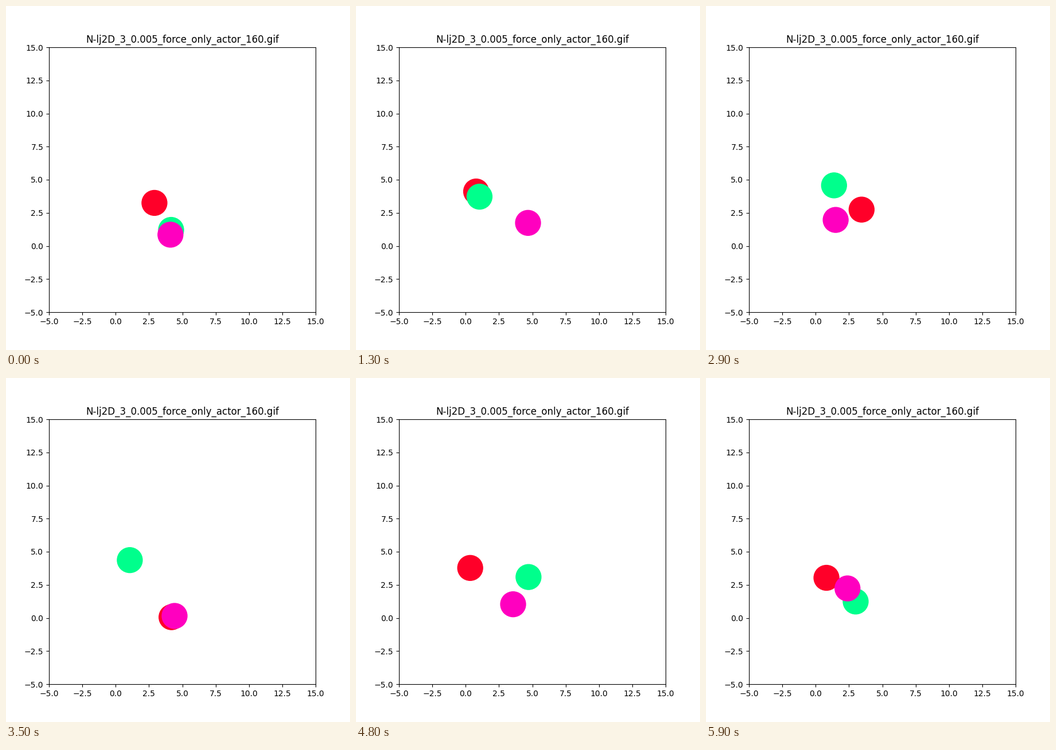
A matplotlib script for the animation above (6 s loop, 600 by 600 pixels).

```python
import matplotlib.pyplot as plt
import numpy as np
from matplotlib.animation import FuncAnimation

FRAMES = 60
INTERVAL = 100
CELL = 5.0   # side of the periodic box
DECAY = 50   # frames over which the initial kick fades

# One (x, y) row per particle; speeds are per frame.
START = np.array([(2.91, 3.25), (4.16, 1.21), (4.11, 0.85)])
DRIFT = np.array([(0.246, -0.5775), (-0.3484, -0.2487), (-0.8397, 0.1536)])
KICK = np.array([(0, 0.3008), (0.56, 0.515), (1.0129, -0.4877)])
ACCEL = np.array([(-0.0038, -0.0009), (0, -0.0018), (-0.0013, -0.0062)])


def positions(t):
    """Steady drift, fading kick and constant pull, wrapped into the box."""
    faded = DECAY * (1 - np.exp(-t / DECAY))
    return (START + DRIFT * t + KICK * faded + ACCEL * t**2 / 2) % CELL


fig, ax = plt.subplots(figsize=(6, 6), dpi=100)
ax.set(xlim=(-5, 15), ylim=(-5, 15),
       title="N-lj2D_3_0.005_force_only_actor_160.gif")
dots = ax.scatter(*positions(0).T, s=1000, c=range(3), cmap="gist_rainbow")


def update(frame):
    dots.set_offsets(positions(frame))
    return (dots,)


anim = FuncAnimation(fig, update, frames=FRAMES, interval=INTERVAL,
                     repeat=True, repeat_delay=0)
plt.show()
```
